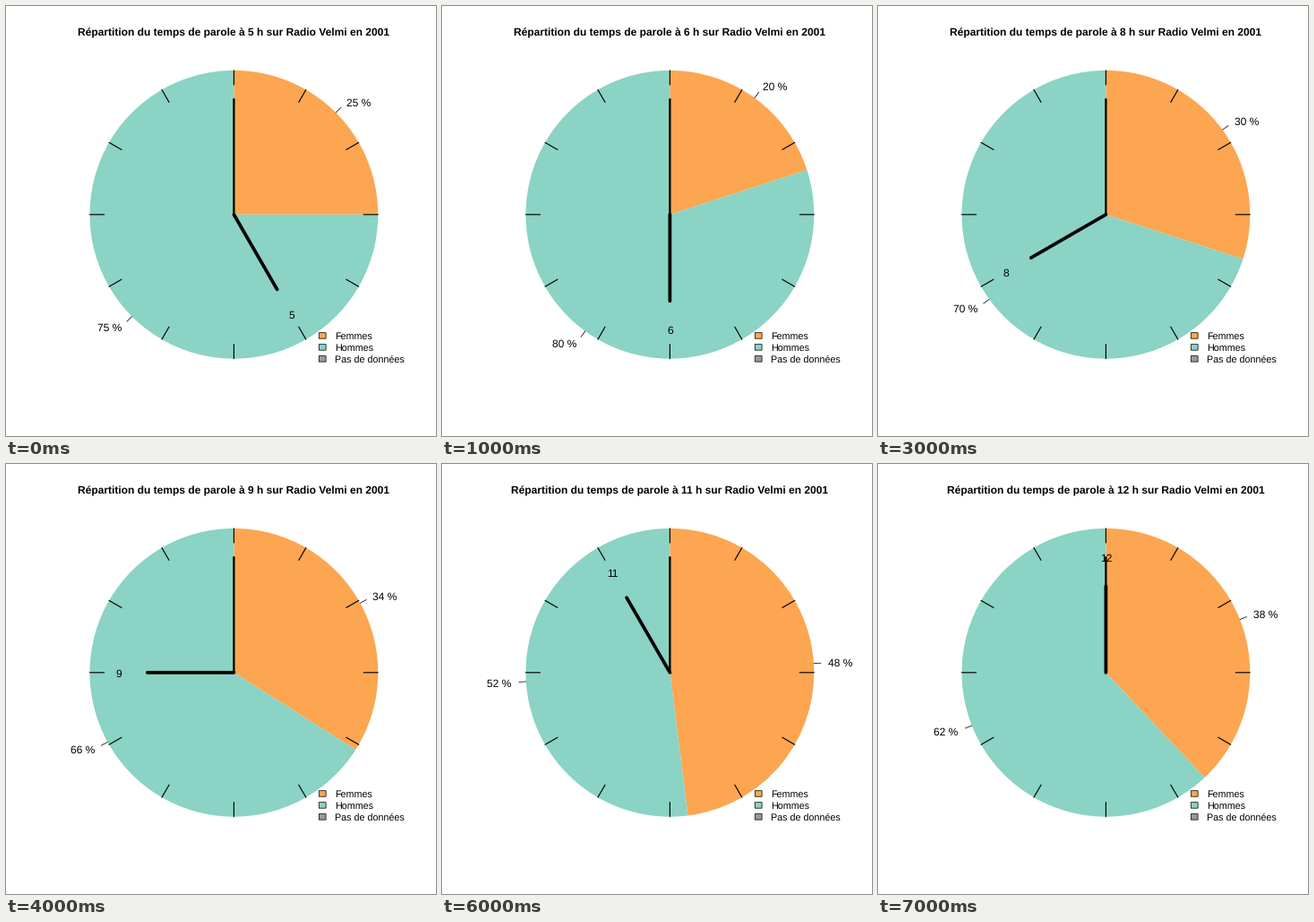
These frames come from a looping animation (480x480 px, 8000 ms). A matplotlib script:

```python
import numpy as np
import matplotlib.pyplot as plt
from matplotlib.animation import FuncAnimation
from matplotlib.patches import Rectangle, Wedge

plt.rcParams["font.family"] = "Liberation Sans"
plt.rcParams["text.hinting"] = "none"

SIZE = 480
CX, CY, R = 254.4, 232.8, 160.9
ORANGE, TEAL, GREY = "#fca651", "#8bd3c4", "#999999"
FIRST_HOUR = 5
WOMEN = [25, 20, 25, 30, 34, 52, 48, 38]  # percent, one per hour

fig = plt.figure(figsize=(SIZE / 72, SIZE / 72), dpi=72, facecolor="white")
ax = fig.add_axes([0, 0, 1, 1])
ax.set(xlim=(0, SIZE), ylim=(SIZE, 0))
ax.axis("off")


def at(turn, dist):
    """Point at a clockwise fraction of a turn from noon."""
    a = 2 * np.pi * turn
    return CX + R * dist * np.sin(a), CY - R * dist * np.cos(a)


def spoke(turn, start, end, width, cap="round", z=3):
    (x0, y0), (x1, y1) = at(turn, start), at(turn, end)
    line, = ax.plot([x0, x1], [y0, y1], color="black", lw=width,
                    solid_capstyle=cap, snap=False, zorder=z)
    return line


def move(line, turn, start, end):
    (x0, y0), (x1, y1) = at(turn, start), at(turn, end)
    line.set_data([x0, x1], [y0, y1])


def label(x=0, y=0, s="", size=12, ha="center", **kw):
    return ax.text(x, y, s, size=size, ha=ha, va="baseline", zorder=5, **kw)


slices = [ax.add_patch(Wedge((CX, CY), R, 0, 90, fc=c, ec="none", lw=0))
          for c in (ORANGE, TEAL)]
leaders = [spoke(0, 1, 1.05, 0.75) for _ in slices]
shares = [label(ha=side) for side in ("left", "right")]

for k in range(12):
    spoke(k / 12, 0.9, 1, 1.15)
spoke(0, 0, 0.8, 2.25, z=4)
hour_hand = spoke(0, 0, 0.6, 3.75, z=4)
hour_text = label()
title = label(CX, 34, weight="bold")

legend = [("Femmes", ORANGE), ("Hommes", TEAL), ("Pas de données", GREY)]
for row, (name, color) in enumerate(legend):
    y = 368 + 12.96 * row
    ax.add_patch(Rectangle((349.3, y - 3.3), 7.8, 6.5, fc=color, ec="black",
                           lw=0.75, snap=False, zorder=5))
    label(366.8, y + 4, name, size=10.8, ha="left")


def draw(i):
    hour = FIRST_HOUR + i
    women = WOMEN[i] / 100
    title.set_text(f"Répartition du temps de parole à {hour} h "
                   "sur Radio Velmi en 2001")
    parts = [(0, women), (women, 1)]
    for (a, b), wedge, lead, text in zip(parts, slices, leaders, shares):
        wedge.set_theta1(270 + 360 * a)
        wedge.set_theta2(270 + 360 * b)
        mid = (a + b) / 2
        move(lead, mid, 1, 1.05)
        x, y = at(mid, 1.1)
        text.set_position((x, y + 4.6))
        text.set_text(f"{round(100 * (b - a))} %")
    move(hour_hand, hour / 12, 0, 0.6)
    x, y = at(hour / 12, 0.8)
    hour_text.set_position((x, y + 4.8))
    hour_text.set_text(str(hour))
    return []


anim = FuncAnimation(fig, draw, frames=len(WOMEN), interval=1000,
                     repeat=True, repeat_delay=0, blit=False)
plt.show()
```
